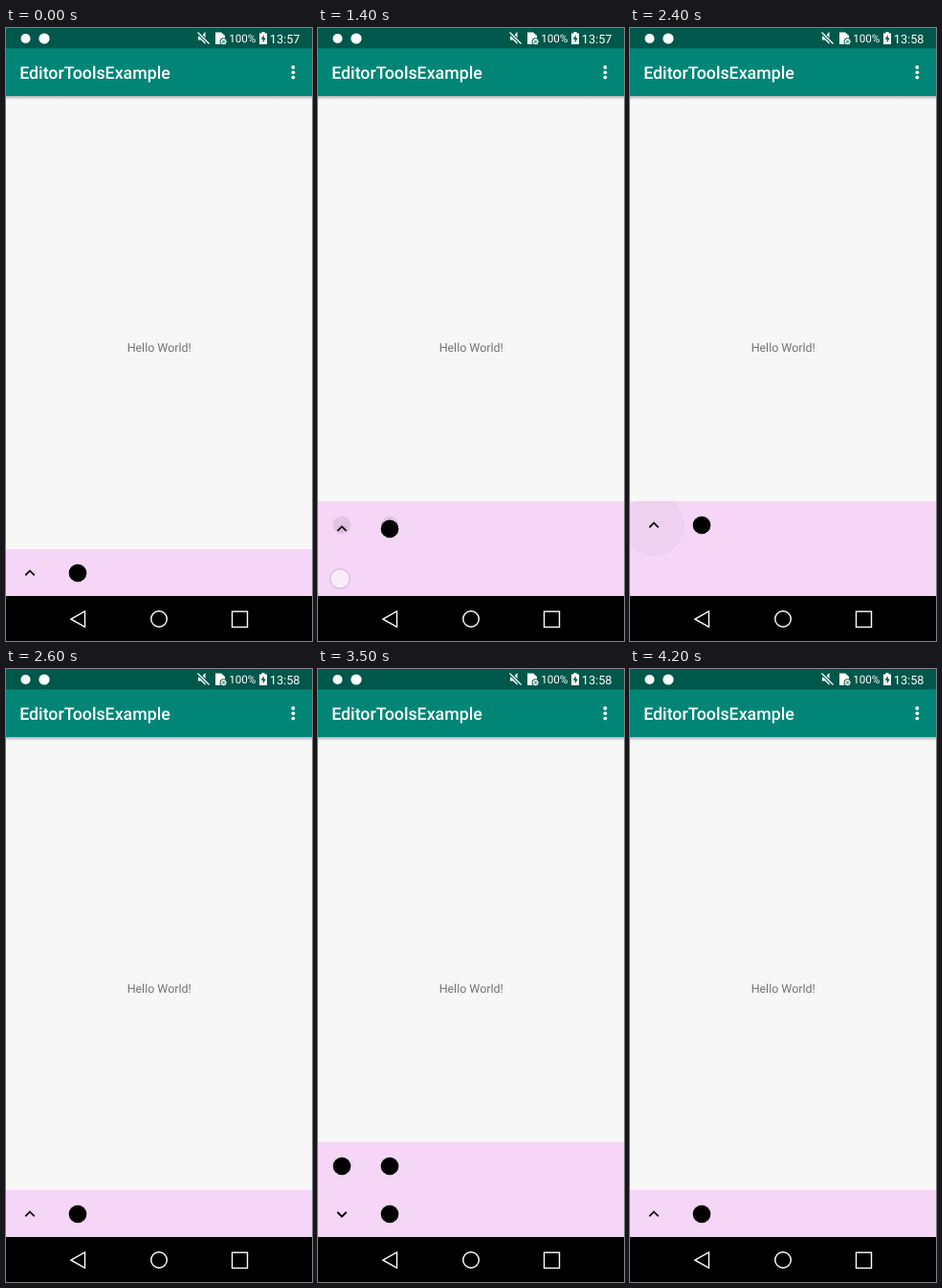
Animation, 320 px wide and 640 px high, one loop 4.5 s. Source, as an HTML page:

```html
<!DOCTYPE html>
<html lang="en">
<head>
<meta charset="utf-8">
<title>Expanding toolbar</title>
<style>
  html, body { margin: 0; width: 100%; height: 100%; overflow: hidden; background: #000; }
  svg { display: block; width: 100vw; height: 100vh; }
  text { font-family: Roboto, sans-serif; fill: #fff; text-rendering: geometricPrecision; }
  .line { fill: none; stroke: #fff; stroke-width: 1.4; }
  .chevron { fill: none; stroke: #000; stroke-width: 1.8; }
</style>
</head>
<body>
<svg viewBox="0 0 320 640">
  <defs>
    <linearGradient id="shade" x2="0" y2="1">
      <stop stop-color="#000" stop-opacity=".28"/>
      <stop offset="1" stop-color="#000" stop-opacity="0"/>
    </linearGradient>
    <clipPath id="panelClip"><rect y="494" width="320" height="100"/></clipPath>
    <circle id="tool" r="9.3"/>
  </defs>

  <rect width="320" height="640" fill="#f7f7f7"/>
  <rect y="71" width="320" height="4" fill="url(#shade)"/>
  <rect y="21" width="320" height="50" fill="#008577"/>
  <rect width="320" height="21.3" fill="#00574b"/>

  <!-- status bar -->
  <g fill="#fff">
    <circle cx="20.5" cy="11" r="5"/>
    <circle cx="40" cy="11" r="5.6"/>
    <path d="M201 8.5h3l4.500-4.500v13l-4.500-4.500h-3z"/>
    <path d="M200.500 4.500l12 12" stroke="#00574b" stroke-width="3.4"/>
    <path d="M200.500 4.500l12 12" stroke="#fff" stroke-width="1.3"/>
    <path d="M219 4.500h6l4 3.500v9h-10z"/>
    <circle cx="227.500" cy="14.200" r="3.600" stroke="#00574b"/>
    <path d="M226 12.700l3 3m0-3l-3 3" stroke="#00574b"/>
    <path d="M265 5.500h2.500v-1.500h3v1.500h2.500v11.500h-8z"/>
    <path d="M269.700 7l-3 4.800h2v3.600l3-4.800h-2z" fill="#00574b"/>
  </g>
  <text x="233.2" y="15.300" font-size="11.6">100%</text>
  <text id="clock" x="275.8" y="15.800" font-size="12.7">13:57</text>

  <text x="14.2" y="53" font-size="17.78" font-weight="500">EditorToolsExample</text>
  <g fill="#fff">
    <circle cx="300.3" cy="41" r="1.9"/>
    <circle cx="300.3" cy="46.300" r="1.9"/>
    <circle cx="300.3" cy="51.600" r="1.9"/>
  </g>
  <text x="160.2" y="337.500" font-size="12.44" text-anchor="middle" style="fill:#737373">Hello World!</text>

  <!-- tool panel -->
  <rect id="panel" y="544" width="320" height="50" fill="#f5d6f6"/>
  <g clip-path="url(#panelClip)">
    <circle id="ripple" cx="25" r="0" fill="#000" fill-opacity=".026"/>
    <g id="extra">
      <use href="#tool" x="25" y="519"/>
      <use href="#tool" x="75" y="519"/>
    </g>
    <g id="row">
      <path id="up" class="chevron" d="M20.300 2.300l4.700-4.600 4.700 4.600"/>
      <path id="down" class="chevron" d="M20.300 -2l4.700 4.700 4.700-4.700"/>
      <use href="#tool" x="75"/>
    </g>
  </g>
  <circle id="touch" r="10.200" fill="#fff" fill-opacity=".55" stroke="#b5a5c4" stroke-opacity=".75"/>

  <!-- navigation bar -->
  <rect y="593" width="320" height="47"/>
  <g class="line">
    <path d="M68 617.200l14.500-8.200v16.400z"/>
    <circle cx="160" cy="617" r="8.3"/>
    <rect x="236.500" y="609.200" width="16" height="16.300"/>
  </g>
</svg>
<script>
const LOOP = 4500, STEP = 100, MOVE = 250;
const TOP_ROW = 519, BOTTOM_ROW = 569;

// tall: span with the two-row panel; opens/closes: start of each move.
const cycles = [
  { opens: 1355, closes: 2090, tall: [1355, 2500] },
  { opens: 2973, closes: 3790, tall: [2973, 4200] }
];
const touches = [
  { span: [1300, 1500], x: 23, y: 575 },
  { span: [2000, 2200], x: 24, y: 569 },
  { span: [3000, 3100], x: 24, y: 569 },
  { span: [3700, 3900], x: 24, y: 569 }
];

const el = id => document.getElementById(id);
const set = (id, attrs) => {
  for (const key in attrs) el(id).setAttribute(key, attrs[key]);
};
const within = (t, [from, to]) => t >= from && t < to;
const clamp = v => Math.min(1, Math.max(0, v));
const ease = v => (1 - Math.cos(Math.PI * clamp(v))) / 2;

function draw(t) {
  const cycle = cycles.find(c => within(t, c.tall));
  const open = cycle
    ? ease((t - cycle.opens) / MOVE) - ease((t - cycle.closes) / MOVE)
    : 0;
  const rowY = cycle ? TOP_ROW + (BOTTOM_ROW - TOP_ROW) * open : BOTTOM_ROW;
  const closing = cycle && t >= cycle.closes;
  const touch = touches.find(p => within(t, p.span));

  set('panel', cycle ? { y: 494, height: 100 } : { y: 544, height: 50 });
  set('extra', { opacity: open });
  set('row', { transform: `translate(0 ${rowY})` });
  set('up', { opacity: 1 - open });
  set('down', { opacity: open });
  set('ripple', {
    cy: rowY,
    r: closing ? 32 * clamp((t - cycle.closes + 100) / MOVE) : 0
  });
  set('touch', touch ? { cx: touch.x, cy: touch.y, opacity: 1 } : { opacity: 0 });
  el('clock').textContent = t < 2100 ? '13:57' : '13:58';
}

const start = performance.now();
function tick() {
  const t = (performance.now() - start) % LOOP;
  draw(Math.floor(t / STEP) * STEP);
  requestAnimationFrame(tick);
}
tick();
</script>
</body>
</html>
```
